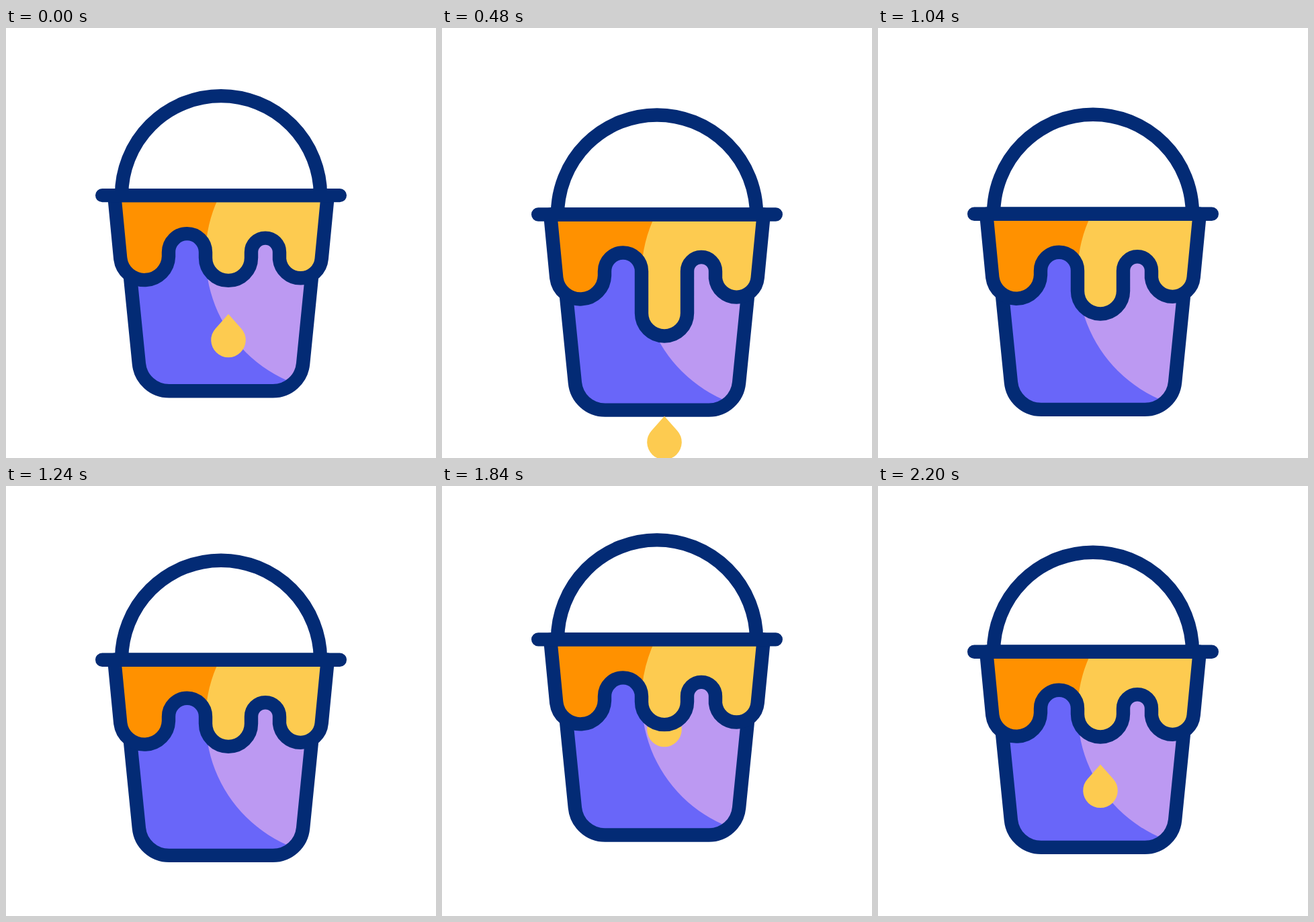
Write an HTML page that moves like this. It is 640 px wide and 640 px high and loops after 2.24 s.

```html
<!DOCTYPE html>
<html lang="en">
<head>
<meta charset="utf-8">
<title>Paint bucket</title>
<style>
html, body { margin: 0; height: 100%; overflow: hidden; background: #fff; }
svg { display: block; width: 100vw; height: 100vh; }
.line { fill: none; stroke: #032b75; stroke-width: 20.4; stroke-linecap: round; stroke-linejoin: round; }
</style>
</head>
<body>
<svg viewBox="0 0 640 640">
  <g class="bucket">
    <path fill="#6966f9" d="M173 248.5L197.9 499.1A45 45 0 0 0 242.7 539.7H397.3A45 45 0 0 0 442.1 499.1L467 248.5Z"/>
    <path fill="#bc99f2" d="M318 248.5A203.3 203.3 0 0 0 428 528A45 45 0 0 0 442.1 499.1L467 248.5Z"/>
    <path class="line" d="M183 350L197.9 499.1A45 45 0 0 0 242.7 539.7H397.3A45 45 0 0 0 442.1 499.1L457 350"/>
  </g>
  <path id="drop" fill="#fdcb50" d="M331 425.5L350.3 447.1A25.8 25.8 0 1 1 311.7 447.1Z"/>
  <g class="bucket">
    <path class="paint" fill="#fdcb50"/>
    <path fill="#ff9100" d="M161.2 248.5H318A203.3 203.3 0 0 0 297 333A27.5 27.5 0 0 0 242 333V339.5A36 36 0 0 1 170.3 343Z"/>
    <path class="paint line"/>
    <path class="line" d="M172 248.5A148 148 0 0 1 468 248.5M143.2 248.5H496.8"/>
  </g>
</svg>
<script>
const LOOP = 2240;
const buckets = document.querySelectorAll('.bucket');
const paints = document.querySelectorAll('.paint');
const drop = document.getElementById('drop');

const clamp = u => Math.min(1, Math.max(0, u));
const sine = u => (1 - Math.cos(Math.PI * clamp(u))) / 2;

// Ease with horizontal handles at x1 and x2, solved by bisection
function ease(x, x1, x2) {
  let lo = 0, hi = 1, s;
  for (let i = 0; i < 24; i++) {
    s = (lo + hi) / 2;
    const r = 1 - s;
    if (3 * x1 * s * r * r + 3 * x2 * s * s * r + s ** 3 < x) lo = s; else hi = s;
  }
  return s * s * (3 - 2 * s);
}

// Vertical float: sinks to its lowest point at 780 ms, rises until 1740 ms
function bob(t) {
  const top = -22, range = 60.6;
  if (t > 780 && t < 1740) return top + range * (1 - sine((t - 780) / 960));
  const since = (t - 1740 + LOOP) % LOOP;
  return top + range * ease(since / 1280, .22, .75);
}

const drip = t => 61.6 * (t < 620 ? sine(t / 620) : 1 - sine((t - 620) / 710));

function paintPath(len) {
  const y = 341.3 + len;
  return `M161.2 248.5L170.3 343A36 36 0 0 0 242 339.5V333A27.5 27.5 0 0 1 297 333` +
    `V${y}A34 34 0 0 0 365 ${y}V333A21 21 0 0 1 407 333V343.5` +
    `A31.5 31.5 0 0 0 469.7 343L478.8 248.5Z`;
}

function draw(now) {
  const t = now % LOOP;
  const shift = `translate(0 ${bob(t)})`;
  buckets.forEach(b => b.setAttribute('transform', shift));
  const d = paintPath(drip(t));
  paints.forEach(p => p.setAttribute('d', d));

  // The drop accelerates across the loop boundary
  const n = (t > 1200 ? t - LOOP : t) / 40;
  drop.setAttribute('visibility', n > -14 && n < 18 ? 'visible' : 'hidden');
  drop.setAttribute('transform', `translate(0 ${11.32 * n + .112 * n * n})`);
  requestAnimationFrame(draw);
}
draw(0);
</script>
</body>
</html>
```
